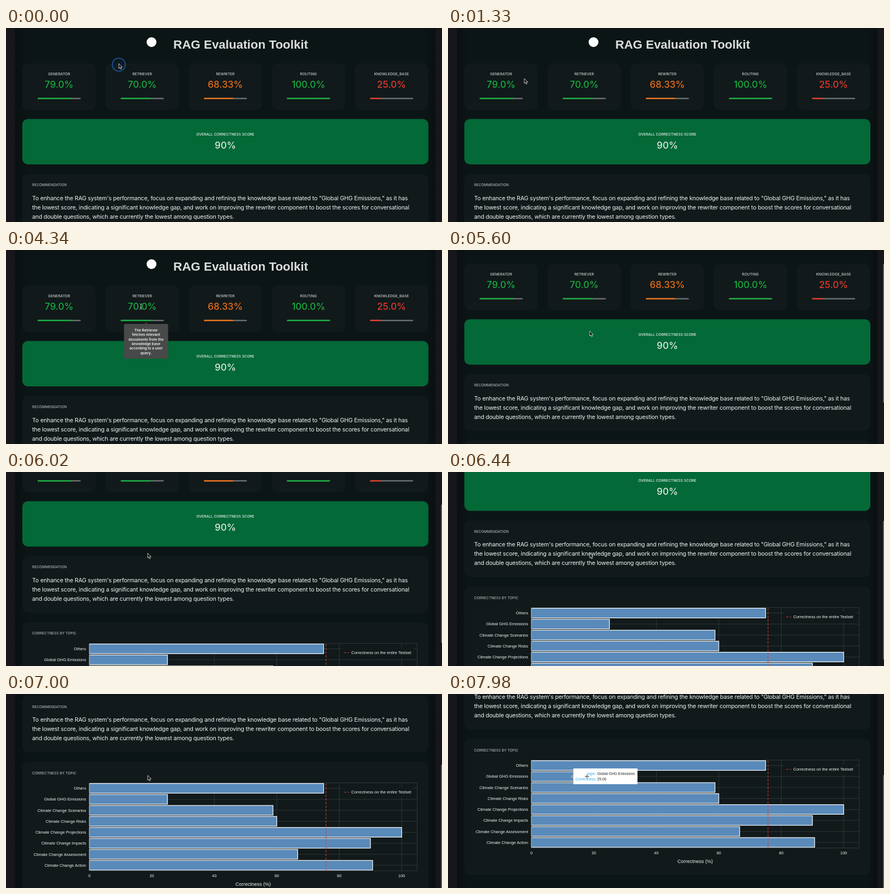
Write an HTML page that moves like this. It is 800 px wide and 357 px high and loops after 8000 ms.

```html
<!DOCTYPE html>
<html lang="en">
<head>
<meta charset="utf-8">
<title>RAG Evaluation Toolkit</title>
<style>
  html, body { margin: 0; width: 100%; height: 100%; overflow: hidden; background: #17161b; }
  svg { display: block; width: 800px; height: 357px; font-family: Inter, sans-serif; }
  .title { font: bold 22.4px "Liberation Sans", Arial, sans-serif; fill: #dbdedd; }
  .label { font-size: 6.7px; font-weight: 500; fill: #c9cdcd; }
  .head { font-size: 6.6px; fill: #c3c8c8; }
  .score { font-size: 17.1px; font-weight: 500; }
  .body { font-size: 10.7px; letter-spacing: -.2px; fill: #f1f3f3; }
  .tip { font-size: 6.6px; font-weight: 600; fill: #f4f4f4; }
  .chart { font: 7.5px "Liberation Sans", Arial, sans-serif; fill: #f0f2f2; }
  .axis { font-size: 9px; }
  .hover { font: 6.7px "Liberation Sans", Arial, sans-serif; fill: #222; }
  .hover .key { fill: #26aae1; }
  .mid { text-anchor: middle; }
  .end { text-anchor: end; }
  .card { fill: #11191a; }
</style>
</head>
<body>
<svg viewBox="0 0 800 357">
  <defs>
    <linearGradient id="panel">
      <stop offset="0" stop-color="#0a1011"/>
      <stop offset=".03" stop-color="#0c1516"/>
      <stop offset=".97" stop-color="#0c1516"/>
      <stop offset="1" stop-color="#0a1011"/>
    </linearGradient>
  </defs>
  <rect width="800" height="357" fill="#17161b"/>
  <rect x="16.5" width="771.5" height="357" fill="url(#panel)"/>
  <g id="page"></g>
  <rect id="thumb" x="798.4" width="3" height="255" rx="1.2" fill="#6c6f70"/>
  <g id="hover" class="hover">
    <path d="M230 147.5L224.5 152L230 156.500Z" fill="#93a3b3"/>
    <rect x="230" y="137" width="117.7" height="29" fill="#fff"/>
    <text class="key end" x="272" y="148.800">topic:</text>
    <text x="273.800" y="148.800">Global GHG Emissions</text>
    <text class="key end" x="272" y="159.300">Correctness:</text>
    <text x="273.800" y="159.300">25.00</text>
  </g>
  <circle id="ring" cx="207" cy="67.5" r="12" fill="#0d2036" fill-opacity=".4" stroke="#1d5c9f" stroke-width="1.6"/>
  <g id="cursor">
    <path id="arrow" d="M0 0V8.800L2 7L3.400 10.200L5 9.500L3.600 6.400H6.300Z" fill="#0b0b0b" stroke="#f2f2f2" stroke-width=".8" stroke-linejoin="round"/>
    <g id="beam" fill="none" stroke-linecap="round">
      <path d="M-2 -5Q0 -5 0 -3.500V3.500Q0 5 -2 5M2 -5Q0 -5 0 -3.500M0 3.500Q0 5 2 5M-1.200 1.500H1.200" stroke="#0c1213" stroke-width="2"/>
      <path d="M-2 -5Q0 -5 0 -3.500V3.500Q0 5 -2 5M2 -5Q0 -5 0 -3.500M0 3.500Q0 5 2 5M-1.200 1.500H1.200" stroke="#d5dad8" stroke-width=".9"/>
    </g>
    <g id="cross">
      <path d="M-4 0H4M0 -4V4" stroke="#fff" stroke-width="1.6"/>
      <path d="M-4 0H4M0 -4V4" stroke="#222" stroke-width=".9"/>
    </g>
  </g>
</svg>
<script>
const $ = id => document.getElementById(id);
const rect = (x, y, w, h, attrs = '') => `<rect x="${x}" y="${y}" width="${w}" height="${h}" ${attrs}/>`;
const text = (x, y, str, cls, attrs = '') => `<text x="${x}" y="${y}" class="${cls}" ${attrs}>${str}</text>`;
const line = (x1, y1, x2, y2, attrs) => `<path d="M${x1} ${y1}L${x2} ${y2}" ${attrs}/>`;

const GREEN = '#17ab40', ORANGE = '#e66e1a', RED = '#e0392c';

function header() {
  return '<circle cx="267" cy="26" r="9" fill="#fff"/>' + text(307, 38, 'RAG Evaluation Toolkit', 'title');
}

function gauges() {
  const items = [
    ['GENERATOR', '79.0', GREEN], ['RETRIEVER', '70.0', GREEN], ['REWRITER', '68.33', ORANGE],
    ['ROUTING', '100.0', GREEN], ['KNOWLEDGE_BASE', '25.0', RED]
  ];
  return items.map(([name, value, color], i) => {
    const x = 30 + 152.5 * i, mid = x + 67.4;
    return rect(x, 65, 134.8, 86, 'rx="11" class="card"') +
      text(mid, 86.7, name, 'label mid') +
      text(mid, 110.3, value + '%', 'score mid', `fill="${color}"`) +
      rect(x + 28, 128.6, 79, 2.5, 'rx="1.2" fill="#6a6e70"') +
      rect(x + 28, 128.6, 79 * value / 100, 2.5, `rx="1.2" fill="${color}"`);
  }).join('');
}

function overall() {
  return rect(30, 167.5, 745, 83.5, 'rx="10" fill="#036936"') +
    text(402.5, 197.5, 'OVERALL CORRECTNESS SCORE', 'label mid', 'style="fill:#e6efea"') +
    text(402.5, 221.7, '90%', 'score mid', 'fill="#dde8e2"');
}

function advice() {
  const lines = [
    'To enhance the RAG system\'s performance, focus on expanding and refining the knowledge base related to "Global GHG Emissions," as it has',
    'the lowest score, indicating a significant knowledge gap, and work on improving the rewriter component to boost the scores for conversational',
    'and double questions, which are currently the lowest among question types.'
  ];
  return rect(30, 268.7, 745, 104, 'rx="11" class="card"') +
    text(48, 291, 'RECOMMENDATION', 'head') +
    lines.map((s, i) => text(48, 316.7 + 16.9 * i, s, 'body')).join('');
}

function chart() {
  const left = 153, right = 754.5, top = 429, row = 20.22, unit = 5.73;
  const bottom = top + row * 8;
  const topics = [
    ['Others', 75], ['Global GHG Emissions', 25], ['Climate Change Scenarios', 58.8],
    ['Climate Change Risks', 60], ['Climate Change Projections', 100], ['Climate Change Impacts', 90],
    ['Climate Change Assessment', 66.7], ['Climate Change Action', 90.7]
  ];
  const grid = 'stroke="#3c4344" stroke-width=".7"';
  const dash = 'stroke="#d0403c" stroke-width="1.1" stroke-dasharray="4 2.8"';
  let out = rect(30, 390.5, 745, 250, 'rx="11" class="card"') + text(48, 413, 'CORRECTNESS BY TOPIC', 'head');
  for (let v = 0; v <= 100; v += 20) {
    const x = left + v * unit;
    out += line(x, top, x, bottom, grid) + text(x, 602.6, v, 'chart mid');
  }
  topics.forEach(([name, value], i) => {
    const y = top + row * (i + .5);
    out += line(left, y, right, y, grid) +
      rect(left, y - 8.9, value * unit, 17.8, 'fill="#598aba" stroke="#fff" stroke-width="1.2"') +
      text(147, y + 2.6, name, 'chart end');
  });
  out += rect(left, top, right - left, bottom - top, `fill="none" ${grid}`);
  out += line(587.2, bottom, 587.2, top, dash);
  out += rect(616, 436.500, 132, 19.5, 'class="card"') + line(620.5, 446.2, 629.5, 446.2, dash) +
    text(633.5, 448.8, 'Correctness on the entire Testset', 'chart');
  return out + text(453.5, 618.7, 'Correctness (%)', 'chart axis mid');
}

function tooltip(id, mid, lines) {
  return `<g id="${id}"><path d="M${mid - 3} 136L${mid} 133L${mid + 3} 136Z" fill="#3a3d3d"/>` +
    rect(mid - 40.5, 136, 81, 13.6 + 8.4 * lines.length, 'rx="2.5" fill="#484949"') +
    lines.map((s, i) => text(mid, 149.8 + 8.4 * i, s, 'tip mid')).join('') + '</g>';
}

$('page').innerHTML = header() + gauges() + overall() + advice() + chart() +
  tooltip('tipGen', 104.4, ['The Generator is the', 'LLM inside the RAG', 'to generate the', 'answers.']) +
  tooltip('tipRet', 257, ['The Retriever', 'fetches relevant', 'documents from the', 'knowledge base', 'according to a user', 'query.']);

// Linear interpolation through [time, ...values] keys
function track(keys, t) {
  const i = keys.findIndex(k => k[0] > t);
  if (i === 0) return keys[0].slice(1);
  if (i < 0) return keys[keys.length - 1].slice(1);
  const a = keys[i - 1], b = keys[i], p = (t - a[0]) / (b[0] - a[0]);
  return a.slice(1).map((v, j) => v + (b[j + 1] - v) * p);
}

const SCROLL = [[5250, 0], [5390, 9], [5600, 40], [6090, 126], [6160, 128], [6440, 179.5],
  [6860, 252], [7000, 265.5], [7070, 265.5], [7350, 302], [7490, 307.5]];
const POINTER = [[980, 207, 65.5], [1120, 190, 72], [1330, 140, 93], [1610, 111, 105], [1890, 109, 106],
  [2660, 109, 106], [2800, 124, 106], [3150, 212, 105], [3360, 243, 104], [3500, 247.5, 104],
  [4340, 247.5, 104], [4480, 251, 114], [4690, 259, 143], [4830, 260, 149],
  [7840, 260, 150], [7980, 255, 151.7]];
const TIP_GEN = [[1400, 0], [1610, 1], [2800, 1], [3010, 0]];
const TIP_RET = [[3150, 0], [3360, 1], [4480, 1], [4690, 0]];
const RING = [[0, 1], [420, 0]];

const LOOP = 8000, STEP = 70;
const show = (id, on) => $(id).setAttribute('opacity', +on);

function draw(now) {
  const t = Math.floor(now % LOOP / STEP) * STEP;
  const [y] = track(SCROLL, t), [px, py] = track(POINTER, t);
  $('page').setAttribute('transform', `translate(0 ${-y})`);
  $('thumb').setAttribute('y', 7.5 + .46 * y);
  $('cursor').setAttribute('transform', `translate(${px} ${py})`);
  const cross = t >= 7210;
  const beam = py > 96 && py < 114 && (px > 70 && px < 126 || px > 222 && px < 278);
  show('cross', cross);
  show('beam', beam);
  show('arrow', !cross && !beam);
  show('thumb', t >= 5320);
  show('hover', t >= 7910);
  show('ring', track(RING, t)[0]);
  show('tipGen', track(TIP_GEN, t)[0]);
  show('tipRet', track(TIP_RET, t)[0]);
}

let start;
function tick(now) {
  start ??= now;
  draw(now - start);
  requestAnimationFrame(tick);
}
draw(0);
requestAnimationFrame(tick);
</script>
</body>
</html>
```
